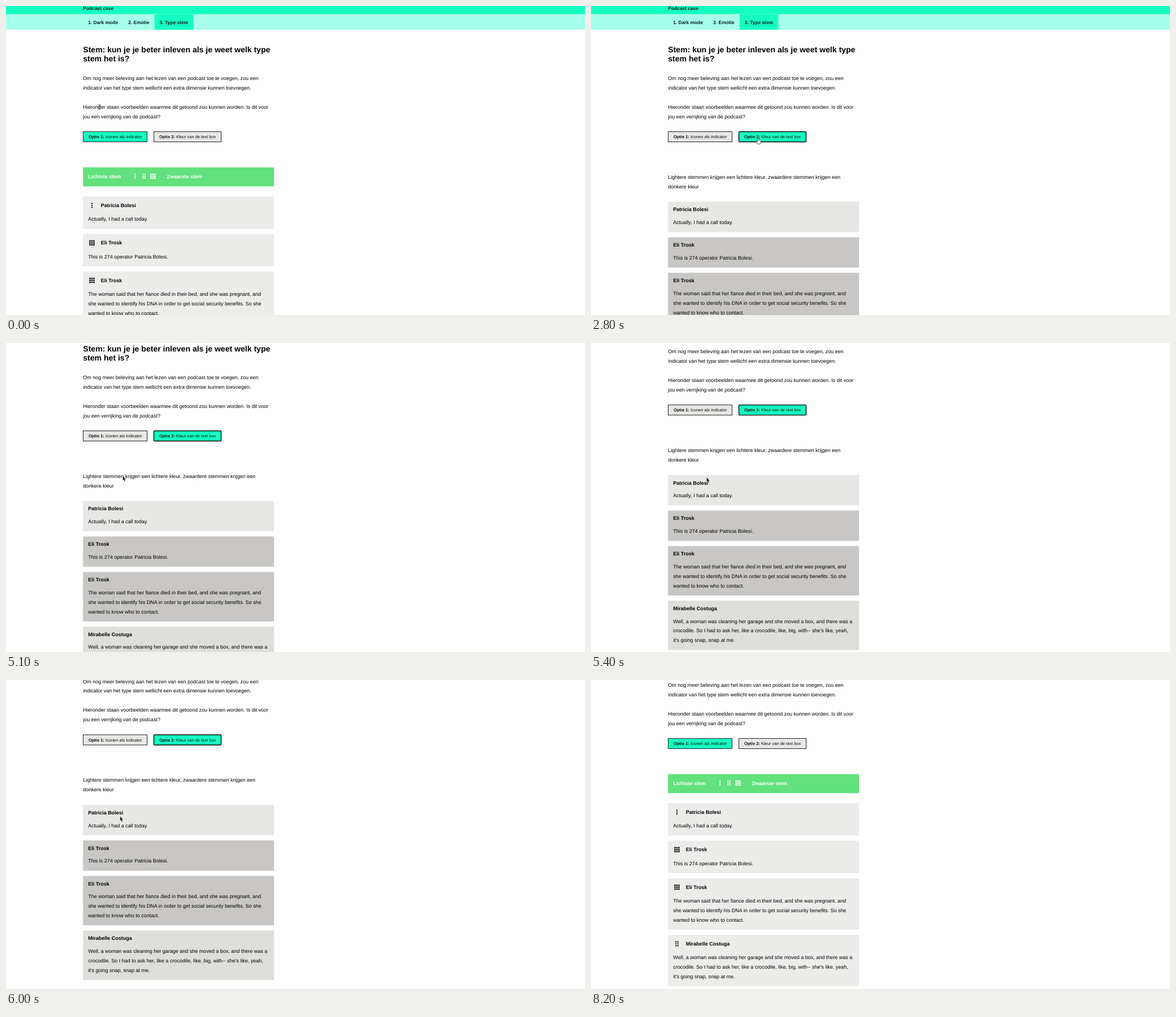
Recreate the animation shown at these times as an HTML page. Size 1024 by 547 pixels, loop 8400 ms.

```html
<!DOCTYPE html>
<html lang="nl">
<head>
<meta charset="utf-8">
<title>Podcast case</title>
<style>
  html, body { margin: 0; width: 100%; height: 100%; overflow: hidden; background: #fefefe; }
  svg { display: block; width: 100%; height: 100%; }
  text { font: 9px "Liberation Sans", Arial, sans-serif; fill: #000; text-rendering: geometricPrecision; }
  .b { font-weight: bold; }
  .nav { font-size: 8.44px; font-weight: bold; fill: #0b1f1a; }
  .h { font-size: 14.06px; font-weight: bold; }
  .btn { font-size: 7.5px; fill: #111; }
  .w { fill: #fff; }
</style>
</head>
<body>
<svg id="stage" viewBox="0 0 1024 547" preserveAspectRatio="none"></svg>
<script>
const LOOP = 8400, STEP = 100;
const PICK_TWO = 2800, PICK_ONE = 6700, CURSOR_OUT = 7900, BLUR = 8200;
const TEAL = '#14ffc1', GREY = '#e7e7e5';
const LEFT = 136.2, WIDE = 337.8, TEXT_X = 136.3, PAD = 9, GAP = 9.1, LINE = 16.875;

const text = (x, y, str, cls = '') => `<text x="${x}" y="${y}" class="${cls}">${str}</text>`;
const lines = (x, y, rows, gap = LINE, cls = '') => rows.map((r, i) => text(x, y + i * gap, r, cls)).join('');
const rect = (x, y, w, h, fill, more = '') =>
  `<rect x="${x}" y="${y}" width="${w}" height="${h}" fill="${fill}" ${more}/>`;

// Voice icons: one or two columns of dots, or a block of nine cells
function icon(cols, cx, cy, fill) {
  let out = '';
  for (let c = 0; c < cols; c++) for (let r = -1; r <= 1; r++) {
    const x = cx + (c - (cols - 1) / 2) * 3.5, y = cy + r * 3.4;
    out += cols === 3
      ? rect(x - 1.35, y - 1.25, 2.7, 2.5, fill)
      : `<circle cx="${x}" cy="${y}" r="1.2" fill="${fill}"/>`;
  }
  return out;
}

const speakers = {
  light: { name: 'Patricia Bolesi', cols: 1, tone: '#e7e7e5' },
  middle: { name: 'Mirabelle Costuga', cols: 2, tone: '#dedfda' },
  heavy: { name: 'Eli Trosk', cols: 3, tone: '#c8c7c5' }
};
const talk = [
  ['light', 'Actually, I had a call today.'],
  ['heavy', 'This is 274 operator Patricia Bolesi.'],
  ['heavy',
    'The woman said that her fiance died in their bed, and she was pregnant, and',
    'she wanted to identify his DNA in order to get social security benefits. So she',
    'wanted to know who to contact.'],
  ['middle',
    'Well, a woman was cleaning her garage and she moved a box, and there was a',
    "crocodile. So I had to ask her, like a crocodile, like, big, with-- she's like, yeah,",
    "it's going snap, snap at me."]
];

function cards(top, withIcons) {
  const head = withIcons ? 18.8 : 16.9, body = withIcons ? 43 : 39.5;
  let out = '', y = top;
  for (const [who, ...rows] of talk) {
    const { name, cols, tone } = speakers[who];
    const h = body + 14.3 + (rows.length - 1) * LINE;
    out += rect(LEFT, y, WIDE, h, withIcons ? '#ececeb' : tone);
    if (withIcons) out += icon(cols, 152, y + 15.7, '#1a1414');
    out += text(TEXT_X + PAD + (withIcons ? 22.5 : 0), y + head, name, 'b');
    out += lines(TEXT_X + PAD, y + body, rows);
    y += h + GAP;
  }
  return out + rect(0, y + 26.6, 1024, 60, TEAL);
}

const button = (id, x, w, label, rest) =>
  rect(x, 222.5, w, 18, GREY, `id="${id}"`) +
  text(x + 9.4, 234.1, label, 'btn b') + text(x + 39.4, 234.1, rest, 'btn');

const header =
  rect(0, 0, 1024, 14.6, TEAL) + rect(0, 14.6, 1024, 27.4, '#a6ffea') + rect(262.7, 14.6, 68.5, 27.4, TEAL) +
  text(TEXT_X, 6.9, 'Podcast case', 'nav') + text(145.2, 31.6, '1. Dark mode', 'nav') +
  text(216.2, 31.6, '2. Emotie', 'nav') + text(271.7, 31.6, '3. Type stem', 'nav');

const intro =
  lines(TEXT_X, 82, ['Stem: kun je je beter inleven als je weet welk type', 'stem het is?'], 16.4, 'h') +
  lines(TEXT_X, 131.1, [
    'Om nog meer beleving aan het lezen van een podcast toe te voegen, zou een',
    'indicator van het type stem wellicht een extra dimensie kunnen toevoegen.', '',
    'Hieronder staan voorbeelden waarmee dit getoond zou kunnen worden. Is dit voor',
    'jou een verrijking van de podcast?']);

const legend = rect(LEFT, 285.6, WIDE, 33.7, '#62e17d') +
  text(TEXT_X + PAD, 305, 'Lichtste stem', 'b w') + text(284.5, 305, 'Zwaarste stem', 'b w') +
  [1, 2, 3].map(n => icon(n, 212.2 + n * 15.9, 301.4, '#fff')).join('');

const toneNote = lines(TEXT_X, 305.8, [
  'Lightere stemmen krijgen een lichtere kleur, zwaardere stemmen krijgen een', 'donkere kleur']);

const pointers = `
  <path id="beam" d="M0-4V4M-1.8-4.6Q0-4.6 0-3.6Q0-4.6 1.8-4.6M-1.8 4.6Q0 4.6 0 3.6Q0 4.6 1.8 4.6"
    fill="none" stroke="#444" stroke-width=".9"/>
  <path id="arrow" d="M.4.4V8.2L2.1 6.7L3.4 9.7L4.6 9.2L3.4 6.3H5.6Z"
    fill="#222" stroke="#eee" stroke-width=".8" paint-order="stroke"/>
  <path id="hand" d="M-1 1Q-1 0 0 0Q1 0 1 1V4L4.4 4.8Q5.4 5.1 5.2 7L4.3 10.4Q4 11.4 3 11.4H.2Q-.8 11.4-1.3 10.4L-3.2 7.3Q-3.5 6-2.1 6.3L-1 7.2Z"
    fill="#fff" stroke="#111" stroke-width=".8"/>`;

document.getElementById('stage').innerHTML = rect(0, 0, 1024, 547, '#fefefe') +
  `<g id="page">${header}${intro}` +
  button('one', 136.5, 113, 'Optie 1:', 'Iconen als indicator') +
  button('two', 261.5, 119, 'Optie 2:', 'Kleur van de text box') +
  `<g id="icons">${legend}${cards(337.2, true)}</g>` +
  `<g id="tones">${toneNote}${cards(346.5, false)}</g></g>` +
  `<g id="cursor">${pointers}</g>`;

const el = id => document.getElementById(id);
const show = (id, on) => el(id).setAttribute('display', on ? 'inline' : 'none');

const linear = p => p;
const smooth = p => p * p * (3 - 2 * p);
const speedUp = p => p ** 3;
const glide = p => 1 - (1 - p) ** 5.4;

// Runs a value through moves, each resting at its goal until the next begins
function follow(value, moves, t) {
  for (const { from, to, goal, ease = linear } of moves) {
    if (t <= from) break;
    const p = ease(Math.min(1, (t - from) / (to - from)));
    value = value.map((v, i) => v + (goal[i] - v) * p);
  }
  return value;
}

const scrolling = [
  { from: 4900, to: 5200, goal: [90.4], ease: smooth },
  { from: 5300, to: 5600, goal: [177], ease: smooth },
  { from: 5800, to: 6400, goal: [119], ease: glide }
];

const pointing = [
  { from: 0, to: 900, goal: [176, 249] },
  { from: 1000, to: 1900, goal: [223, 249], ease: speedUp },
  { from: 1900, to: 2200, goal: [268, 243.4] },
  { from: 2300, to: 2700, goal: [295.5, 233] },
  { from: 4000, to: 4100, goal: [281, 231] },
  { from: 4300, to: 4600, goal: [209.5, 231] },
  { from: 4900, to: 5200, goal: [205.2, 236.4], ease: smooth },
  { from: 5300, to: 5600, goal: [201.5, 241], ease: smooth },
  { from: 6000, to: 6400, goal: [179.5, 109.3], ease: smooth },
  { from: 7500, to: 7700, goal: [67.4, 8.4] }
];

function cursorAt(t) {
  const [x, y] = follow([165, 179], pointing, t);
  const bow = t < 900 ? 11 * Math.sin(Math.PI * t / 900) : 0;
  return [x + bow, y];
}

function pointerOver(x, docY) {
  const inColumns = (x > 136 && x < 250) || (x > 261 && x < 381);
  if (inColumns && docY > 222 && docY < 241) return 'hand';
  return docY > 170 && docY < 205 ? 'beam' : 'arrow';
}

function paintButton(id, active, focus) {
  const look = {
    fill: active ? TEAL : GREY,
    stroke: focus ? '#050505' : '#222',
    'stroke-width': focus ? 1.4 : 1,
    rx: focus ? 1.5 : 0
  };
  for (const key in look) el(id).setAttribute(key, look[key]);
}

function draw(ms) {
  const t = Math.floor((ms % LOOP) / STEP) * STEP;
  const [scroll] = follow([0], scrolling, t);
  const [x, y] = cursorAt(t);
  const second = t >= PICK_TWO && t < PICK_ONE;

  el('page').setAttribute('transform', `translate(0 ${-scroll})`);
  show('icons', !second);
  show('tones', second);
  paintButton('one', !second, t >= PICK_ONE && t < BLUR);
  paintButton('two', second, second);

  const shape = pointerOver(x, y + scroll);
  for (const id of ['beam', 'arrow', 'hand']) show(id, id === shape);
  show('cursor', t < CURSOR_OUT);
  el('cursor').setAttribute('transform', `translate(${x} ${y})`);
}

const start = performance.now();
function tick() {
  draw(performance.now() - start);
  requestAnimationFrame(tick);
}
tick();
</script>
</body>
</html>
```
